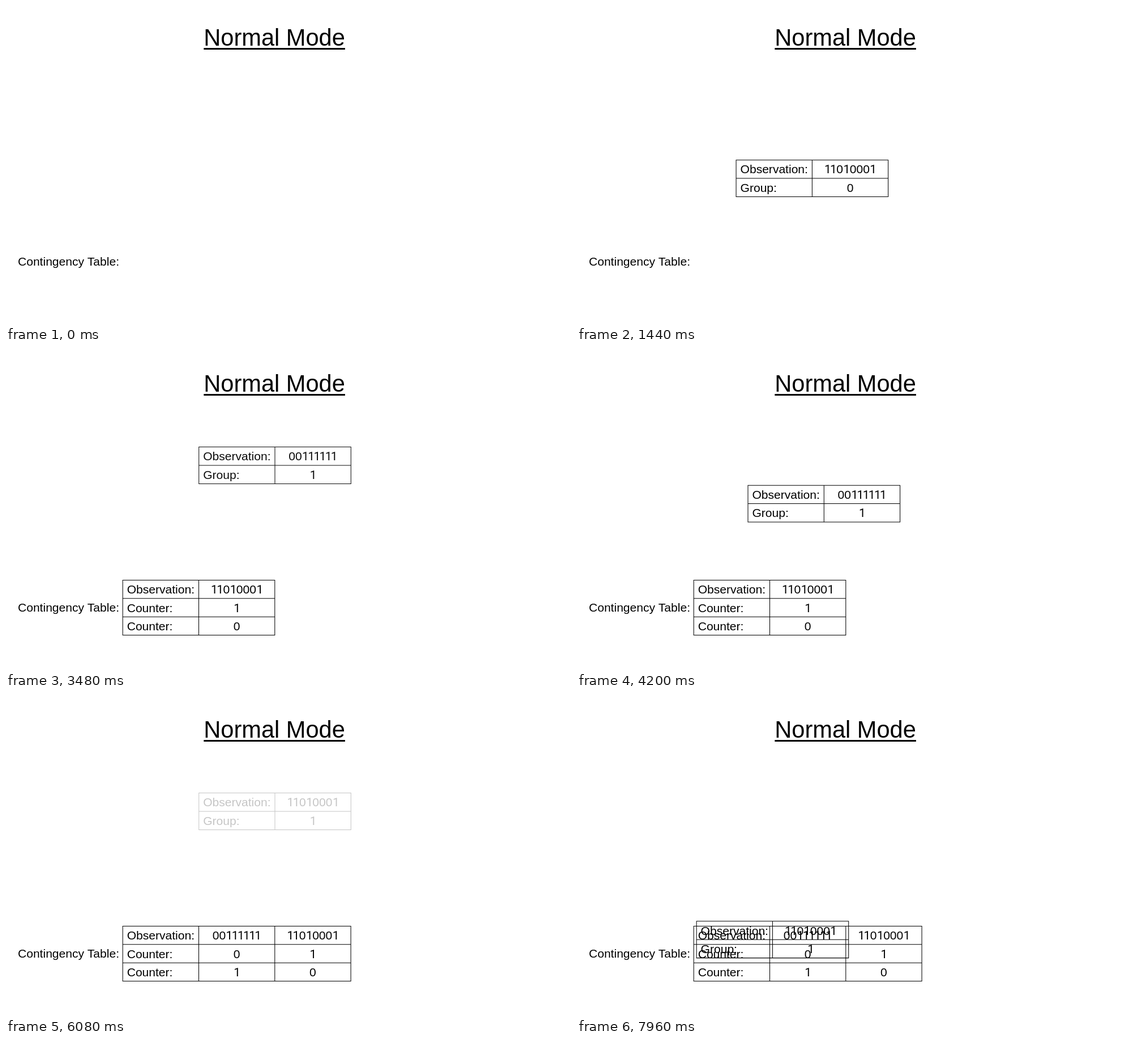
Animation, 998 px wide and 561 px high, one loop 8000 ms. Source, as an HTML page with a canvas:

```html
<!DOCTYPE html>
<html lang="en">
<head>
<meta charset="utf-8">
<title>Normal Mode</title>
<style>
  html, body { margin: 0; width: 100%; height: 100%; overflow: hidden; background: #fff; }
  canvas { display: block; }
</style>
</head>
<body>
<canvas id="stage" width="998" height="561"></canvas>
<script>
const ctx = document.getElementById('stage').getContext('2d');

const LOOP = 8000, STEP = 40;
const FADE = 611, MOVE = 1700, CYCLE = 2 * FADE + MOVE, FIRST = 35;
const SIZE = 21.05, COL = 134.3, ROW = 32.4, PAD = 7.5, BASE = 23.7;
const FROM = { x: 340.7, y: 167.6 }, HOME = { x: 206.2, y: 402.4 };
const SANS = '"Liberation Sans", Arial, sans-serif';
const ONE = 'Roboto, sans-serif';   // its 1 has no foot

const samples = [['11010001', '0'], ['00111111', '1'], ['11010001', '1']];
const tallies = [
  [['11010001', '1', '0']],
  [['00111111', '0', '1'], ['11010001', '1', '0']]
];

const clamp = v => Math.min(1, Math.max(0, v));
const mix = (a, b, p) => a + (b - a) * p;

// Ease-in-out: cubic Bezier (.42, 0, .58, 1)
function ease(u) {
  u = clamp(u);
  if (u === 0 || u === 1) return u;
  let lo = 0, hi = 1, s;
  for (let i = 0; i < 24; i++) {
    s = (lo + hi) / 2;
    const r = 1 - s;
    const x = 1.26 * s * r * r + 1.74 * s * s * r + s * s * s;
    if (x < u) lo = s; else hi = s;
  }
  return s * s * (3 - 2 * s);
}

function text(str, x, y, size = SIZE, family = SANS) {
  ctx.font = `${size}px ${family}`;
  ctx.fillText(str, x, y);
}

// Centred digits, with neighbouring ones kerned together
function digits(str, cx, y) {
  const places = [];
  let w = 0;
  [...str].forEach((d, i) => {
    if (d === '1' && str[i - 1] === '1') w -= 0.074 * SIZE;
    places.push(w);
    w += 0.556 * SIZE;
  });
  [...str].forEach((d, i) => {
    const x = cx - w / 2 + places[i];
    if (d === '1') text(d, x + 0.022 * SIZE, y, SIZE, ONE);
    else text(d, x, y);
  });
}

function table(x, y, labels, columns, alpha) {
  if (alpha <= 0) return;
  const w = COL * (columns.length + 1), h = ROW * labels.length;
  ctx.globalAlpha = alpha;
  ctx.lineWidth = 1.04;
  ctx.beginPath();
  ctx.rect(x, y, w, h);
  for (let r = 1; r < labels.length; r++) {
    ctx.moveTo(x, y + r * ROW);
    ctx.lineTo(x + w, y + r * ROW);
  }
  for (let c = 1; c <= columns.length; c++) {
    ctx.moveTo(x + c * COL, y);
    ctx.lineTo(x + c * COL, y + h);
  }
  ctx.stroke();
  labels.forEach((label, r) => {
    const base = y + r * ROW + BASE;
    text(label, x + PAD, base);
    columns.forEach((col, c) => digits(col[r], x + (c + 1.5) * COL, base));
  });
  ctx.globalAlpha = 1;
}

function draw(t) {
  ctx.fillStyle = '#fff';
  ctx.fillRect(0, 0, 998, 561);
  ctx.fillStyle = ctx.strokeStyle = '#000';

  text('Normal Mode', 349.3, 69.6, 41.58);
  ctx.fillRect(349.3, 74, 249.6, 3);
  text('Contingency Table:', 21, 458.2);

  const since = t - FIRST;
  if (since < 0) return;
  const n = Math.floor(since / CYCLE);
  const local = since - n * CYCLE;
  const landed = local >= FADE + MOVE;

  // The tally is replaced once the sample has landed
  const tally = tallies[landed ? n : n - 1];
  if (tally) {
    const alpha = landed ? ease((local - FADE - MOVE) / FADE) : 1;
    table(HOME.x, HOME.y, ['Observation:', 'Counter:', 'Counter:'], tally, alpha);
  }
  if (!landed) {
    const p = ease((local - FADE) / MOVE);
    table(mix(FROM.x, HOME.x, p), mix(FROM.y, HOME.y, p),
      ['Observation:', 'Group:'], [samples[n]], ease(local / FADE));
  }
}

const start = performance.now();
function tick() {
  const t = (performance.now() - start) % LOOP;
  draw(Math.floor(t / STEP) * STEP);
  requestAnimationFrame(tick);
}
tick();
</script>
</body>
</html>
```
